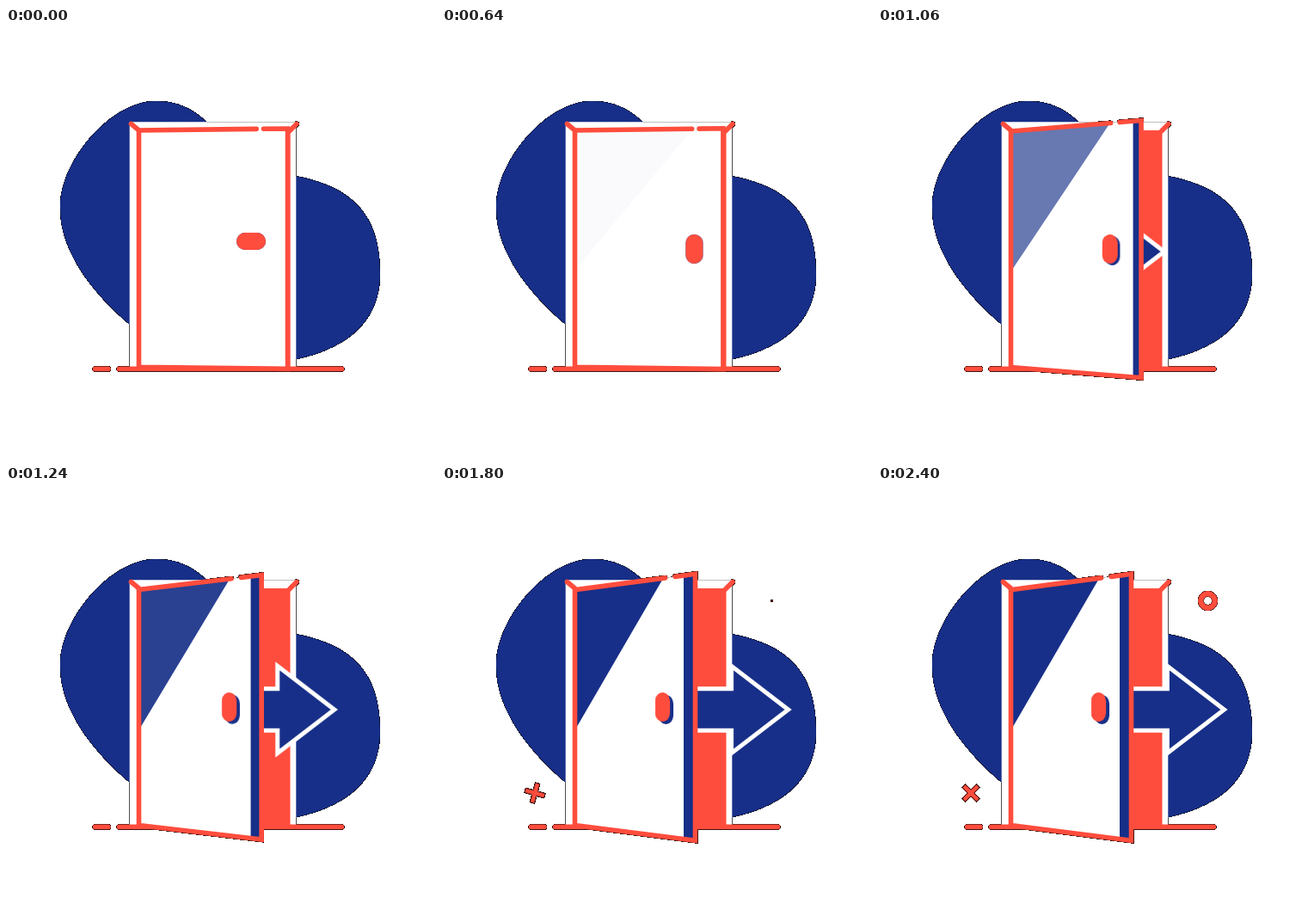
Write an HTML page that moves like this. It is 500 px wide and 500 px high and loops after 2.42 s.

```html
<!DOCTYPE html>
<html lang="en">
<head>
<meta charset="utf-8">
<title>Opening door</title>
<style>
  html, body { margin: 0; width: 100%; height: 100%; overflow: hidden; background: #fff; }
  svg { display: block; width: 100vw; height: 100vh; }

  .blue { fill: #172f88; }
  .red { fill: #ff4d3d; }
  .white { fill: #fff; }
  .line { fill: none; stroke: #ff4d3d; stroke-width: 5.6; stroke-linecap: round; stroke-miterlimit: 8; }

  .anim {
    animation: 2420ms infinite both;
    animation-timing-function: cubic-bezier(.3333, 0, .6667, 1);
  }

  /* Door: swings from 580 to 1380 ms */
  .panel { animation-name: panel; }
  .shade { animation-name: shade; }
  .band { animation-name: band; }
  .outline { animation-name: outline; }
  @keyframes panel {
    0%, 23.967% { d: path("M154.5 119 L327.5 117 L327.5 396.3 L154.5 394.3 Z"); }
    57.025%, 100% { d: path("M154.5 120.6 L294.5 102.3 L294.5 412.4 L154.5 394.5 Z"); }
  }
  @keyframes shade {
    0%, 23.967% { d: path("M154.5 119 L292.4 117.4 L154.5 282 Z"); opacity: 0; }
    57.025%, 100% { d: path("M154.5 120.6 L257.4 107.1 L154.5 284 Z"); opacity: 1; }
  }
  @keyframes band {
    0%, 23.967% { d: path("M325.5 117 L327.5 117 L327.5 396.3 L325.5 396.3 Z"); }
    57.025%, 100% { d: path("M281 104.1 L294.5 102.3 L294.5 412.4 L281 410.7 Z"); }
  }
  @keyframes outline {
    0%, 23.967% { d: path("M291.2 117.4 L154.5 119 L154.5 394.3 L327.5 396.3 L327.5 117 L299.5 117.3"); }
    57.025%, 100% { d: path("M259.5 106.9 L154.5 120.6 L154.5 394.5 L294.5 412.4 L294.5 102.3 L271 105.4"); }
  }

  /* Handle: turns first, then travels with the door */
  .slide { animation-name: slide; transform-origin: 294px 257px; }
  .drop { animation-name: drop; }
  .knob { animation-name: turn, sink; transform-origin: 292.7px 250.3px; }
  @keyframes slide {
    0%, 23.967% { transform: translateX(0) scaleX(1); }
    57.025%, 100% { transform: translateX(-37.5px) scaleX(.86); }
  }
  @keyframes drop {
    0%, 23.967% { transform: translate(0, 0); }
    57.025%, 100% { transform: translate(4.6px, 3px); }
  }
  @keyframes turn {
    0%, 13.64% { rotate: 0deg; }
    24.79%, 100% { rotate: 90deg; }
  }
  @keyframes sink {
    0%, 15.7% { translate: 0 0; }
    24.79%, 100% { translate: -1px 14.4px; }
  }

  .arrow { animation-name: arrow; stroke: #fff; stroke-width: 5; stroke-miterlimit: 8; }
  @keyframes arrow {
    0%, 37.6% { transform: translateX(-116px); animation-timing-function: cubic-bezier(.39, .575, .565, 1); }
    62.81% { transform: translateX(5.6px); }
    75.21%, 100% { transform: translateX(0); }
  }

  .cross { animation-name: grow, spin; transform-origin: 108px 357px; }
  .ring { animation-name: pop; transform-origin: 383.5px 133.5px; }
  @keyframes grow {
    0%, 54.55% { scale: 0; }
    64.46% { scale: 1.05; }
    72.73%, 100% { scale: 1; }
  }
  @keyframes spin {
    0%, 63.64% { rotate: 0deg; }
    90.91%, 100% { rotate: 45deg; }
  }
  @keyframes pop {
    0%, 72.73% { scale: 0; }
    83.47% { scale: 1.18; }
    92.56%, 100% { scale: 1; }
  }
</style>
</head>
<body>
<svg viewBox="0 0 500 500">
  <defs>
    <!-- Hard dark fringe along the outer silhouette -->
    <filter id="fringe" filterUnits="userSpaceOnUse" x="0" y="0" width="500" height="500" color-interpolation-filters="sRGB">
      <feColorMatrix in="SourceGraphic" values="0 0 0 0 0  0 0 0 0 0  0 0 0 0 0  0 0 0 20 0" result="edge"/>
      <feMerge><feMergeNode in="edge"/><feMergeNode in="SourceGraphic"/></feMerge>
    </filter>
  </defs>

  <g filter="url(#fringe)">
    <path class="blue" d="M174 85 C205 85 222 99 233 109 C265 137 290 163 338 172.5 C410 186 435 225 435 285 C435 345 392 373 338 385 C270 395 200 393 143 344 C100 307 63 260 63 209 C63 153 123 85 174 85 Z"/>

    <path class="white" d="M143.7 109.3 H337.3 V395 H143.7 Z"/>
    <path class="red" d="M155 119 H330.5 V395 H155 Z"/>
    <path class="line" d="M145.5 111.5 L154.5 119 M338 111.5 L329.5 120"/>
    <path class="line" d="M103.5 396.4 H119 M131.5 396.4 H390.5"/>

    <path class="blue arrow anim" d="M282 235.8 H336.4 V209.2 L402.5 260 L336.4 310.8 V284.2 H282"/>

    <path class="white panel anim"/>
    <path class="blue shade anim"/>
    <path class="blue band anim"/>
    <path class="line outline anim"/>

    <g class="slide anim">
      <g class="drop anim">
        <rect class="blue knob anim" x="268" y="238" width="34" height="20" rx="10"/>
      </g>
      <rect class="red knob anim" x="268" y="238" width="34" height="20" rx="10"/>
    </g>

    <path class="line cross anim" style="stroke-linecap: butt; stroke-width: 5" d="M96.5 357 H119.5 M108 345.5 V368.5"/>
    <circle class="line ring anim" style="stroke-width: 6.4" cx="383.5" cy="133.5" r="8.2"/>
  </g>
</svg>
</body>
</html>
```
